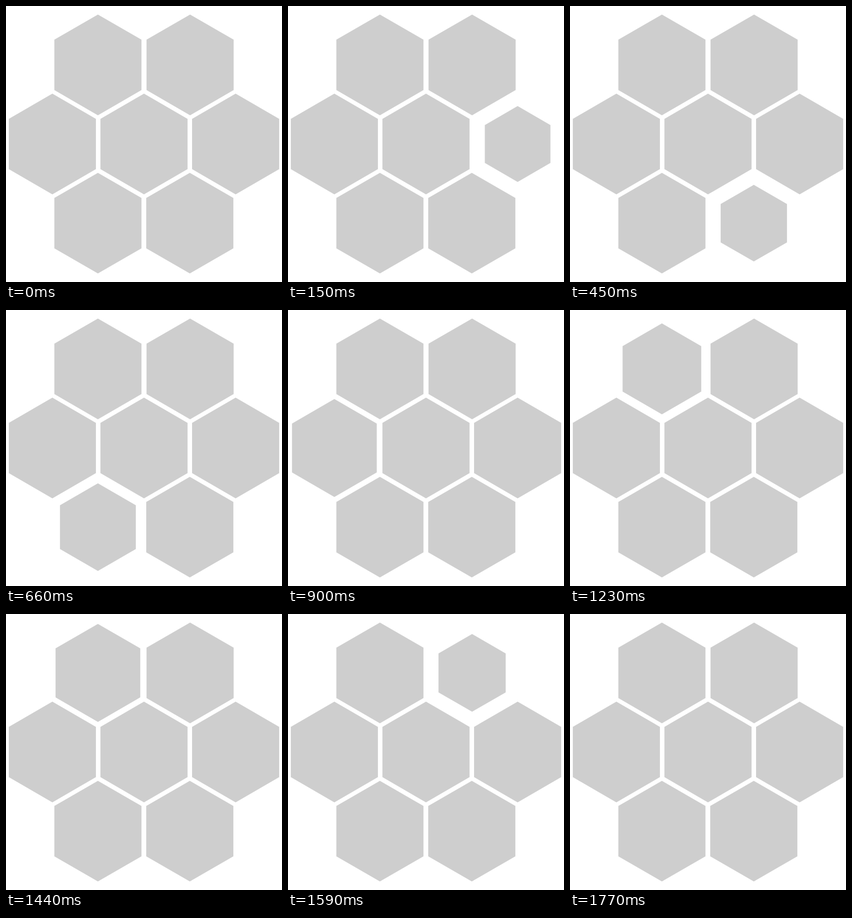
An HTML page for the animation above (1800 ms loop, 500x500 px).

```html
<!DOCTYPE html>
<html lang="en">
<head>
<meta charset="utf-8">
<title>Honeycomb loader</title>
<style>
  html, body { margin: 0; width: 100%; height: 100%; overflow: hidden; background: #fff; }
  svg { display: block; width: 100vw; height: 100vh; }
  polygon { fill: #cecece; }
</style>
</head>
<body>
<svg viewBox="0 0 500 500"></svg>
<script>
const LOOP = 1800, STEP = 30;
const SLOT = 292.5;   // time given to each cell's pulse, ms
const DEPTH = 0.25;   // how far a cell shrinks
const HALF_W = 78.9, HALF_H = 91.2;

// The ring clockwise from the right; the still centre comes last.
const cells = [
  [416, 250], [333, 393.4], [166.5, 393.4],
  [84, 250], [166.5, 106.7], [333.5, 106.7], [250, 250]
];

const svg = document.querySelector('svg');
const corners = [[0, -1], [1, -0.5], [1, 0.5], [0, 1], [-1, 0.5], [-1, -0.5]]
  .map(([x, y]) => `${x * HALF_W},${y * HALF_H}`).join(' ');

const hexes = cells.map(() => {
  const hex = document.createElementNS('http://www.w3.org/2000/svg', 'polygon');
  hex.setAttribute('points', corners);
  return svg.appendChild(hex);
});

// Halfway between linear and smoothstep.
const ease = x => (x + x * x * (3 - 2 * x)) / 2;

function scaleAt(index, time) {
  const phase = (time - index * SLOT) / SLOT;
  if (index === 6 || phase <= 0 || phase >= 1) return 1;
  return phase < 0.5
    ? 1 - DEPTH * ease(phase * 2)
    : 1 - DEPTH + DEPTH * ease(phase * 2 - 1);
}

function draw(time) {
  hexes.forEach((hex, i) => {
    const [x, y] = cells[i];
    hex.setAttribute('transform', `translate(${x} ${y}) scale(${scaleAt(i, time)})`);
  });
}

const start = performance.now();
function tick() {
  const time = (performance.now() - start) % LOOP;
  draw(Math.floor(time / STEP) * STEP);
  requestAnimationFrame(tick);
}
tick();
</script>
</body>
</html>
```
